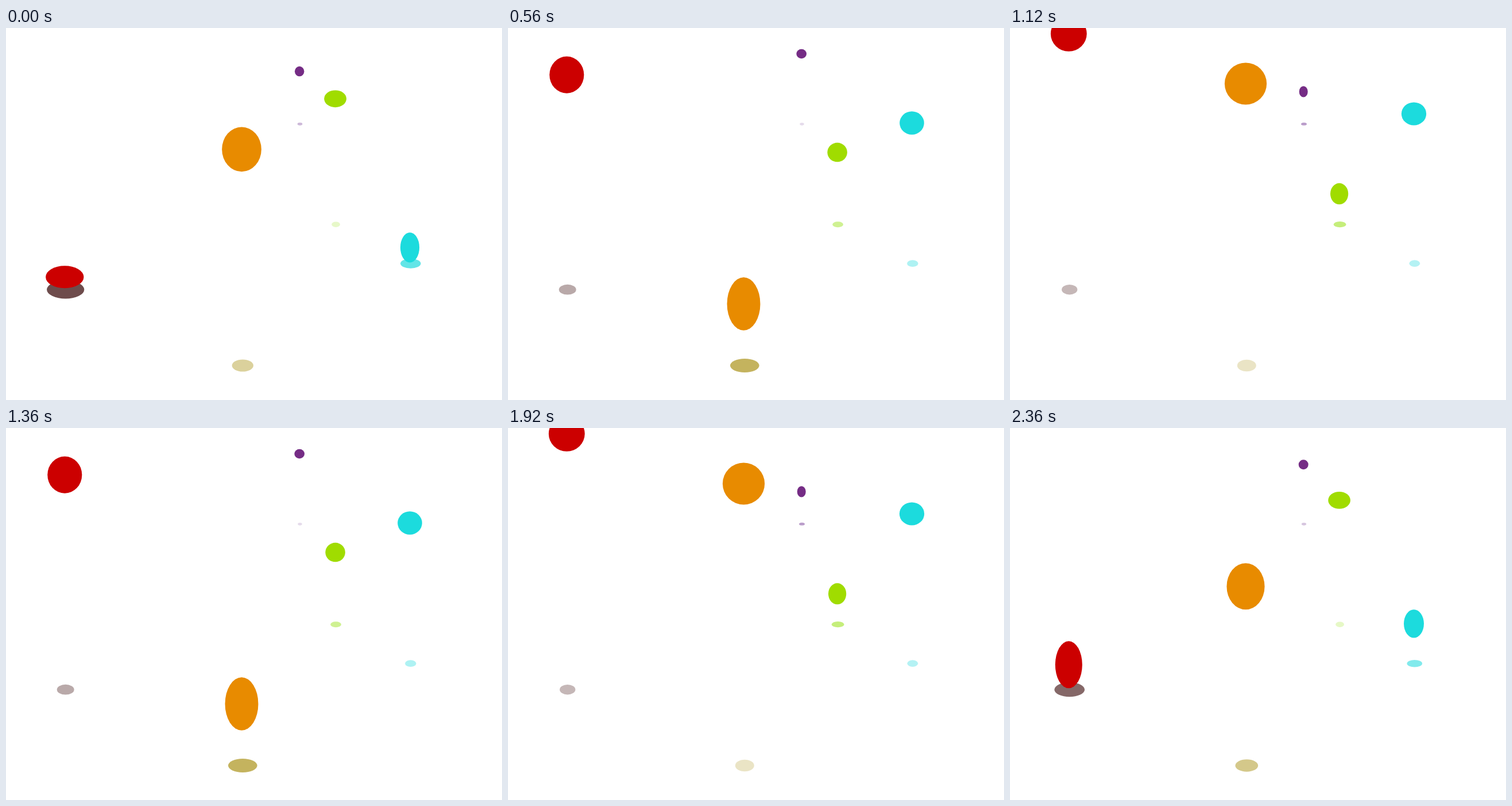
These frames come from a looping animation (864x648 px, 2.4 s). An HTML page with a canvas:

```html
<!DOCTYPE html>
<html lang="en">
<head>
<meta charset="utf-8">
<title>Bouncing balls</title>
<style>
  html, body { margin: 0; width: 100%; height: 100%; overflow: hidden; background: #fff; }
  canvas { display: block; }
</style>
</head>
<body>
<canvas id="stage" width="864" height="648"></canvas>
<script>
const ctx = document.getElementById('stage').getContext('2d');
const PERIOD = 800, STEP = 40;

// apex: time of the highest point; air: half of the flight time (ms)
// slim: width factor at touchdown; fade: how much the shadow pales with height
const balls = [
  { x: 511.2, ground: 165.5, r: 8.5, rise: 114, apex: 604, air: 365, slim: 0.78,
    color: '#752c85', shadow: '140,92,166', shadowX: 512, shadowY: 167.3, fade: 0.39 },
  { x: 573.6, ground: 340.5, r: 17, rise: 202.3, apex: 0, air: 350, slim: 0.876,
    color: '#a0dc00', shadow: '169,230,60', shadowX: 574.6, shadowY: 342.2, fade: 0.32 },
  { x: 703.5, ground: 408.4, r: 20.8, rise: 258.6, apex: 422, air: 370, slim: 0.797,
    color: '#1cdbdd', shadow: '70,224,227', shadowX: 704.8, shadowY: 410.2, fade: 0.24 },
  { x: 102.3, ground: 453.3, r: 31.05, rise: 429, apex: 392, air: 368, slim: 0.758,
    color: '#cc0000', shadow: '110,76,76', shadowX: 103.7, shadowY: 455.7, fade: 0.22 },
  { x: 410.5, ground: 586, r: 36.55, rise: 495, apex: 211, air: 372, slim: 0.76,
    color: '#e88b00', shadow: '173,150,31', shadowX: 412.3, shadowY: 588, fade: 0.42 }
];

const mix = (a, b, k) => a + (b - a) * k;
const smooth = (lo, hi, v) => {
  const k = Math.min(1, Math.max(0, (v - lo) / (hi - lo)));
  return k * k * (3 - 2 * k);
};

function ellipse(x, y, rx, ry, fill) {
  ctx.fillStyle = fill;
  ctx.beginPath();
  ctx.ellipse(x, y, rx, ry, 0, 0, Math.PI * 2);
  ctx.fill();
}

function pose(ball, time) {
  const half = PERIOD / 2;
  const phase = ((time - ball.apex) % PERIOD + PERIOD + half) % PERIOD - half;
  const away = Math.abs(phase);
  const height = Math.max(0, 1 - (away / ball.air) ** 2);
  const contact = Math.max(0, (away - ball.air) / (half - ball.air));
  return { height, squash: smooth(0.25, 0.75, contact), near: Math.max(0, 1 - height / 0.16) };
}

function drawShadow(ball, { height, squash, near }) {
  const rx = ball.r * (0.68 - 0.25 * height + 0.17 * near + 0.2 * squash);
  const ry = ball.r * (0.305 - 0.025 * height + 0.1 * near + 0.1 * squash);
  const alpha = 0.7 - 0.1 * height - ball.fade * height ** 2 + 0.14 * near + 0.16 * squash;
  ellipse(ball.shadowX, ball.shadowY, rx, ry, `rgba(${ball.shadow},${alpha})`);
}

function drawBall(ball, { height, squash }) {
  const wide = ball.slim + 0.265 * height;
  const rx = ball.r * mix(wide, ball.slim + 0.31, squash);
  const ry = ball.r * mix(1 / wide, 0.63, squash);
  ellipse(ball.x, ball.ground - ball.rise * height - ry, rx, ry, ball.color);
}

function draw(time) {
  ctx.fillStyle = '#fff';
  ctx.fillRect(0, 0, 864, 648);
  for (const ball of balls) {
    const state = pose(ball, time);
    drawShadow(ball, state);
    drawBall(ball, state);
  }
}

let start;
function tick(now) {
  start ??= now;
  draw(Math.floor((now - start) / STEP) * STEP % PERIOD);
  requestAnimationFrame(tick);
}
draw(0);
requestAnimationFrame(tick);
</script>
</body>
</html>
```
